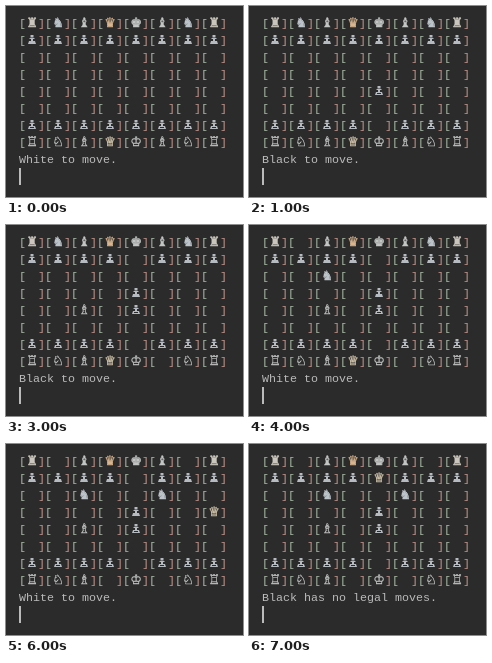
An HTML page for the animation above (8 s loop, 237 by 191 pixels).

```html
<!DOCTYPE html>
<html lang="en">
<meta charset="utf-8">
<title>Console chess</title>
<style>
  html, body { margin: 0; width: 100%; height: 100%; overflow: hidden; background: #2b2b2b; }
  svg { display: block; width: 237px; height: 191px; }
  text { font: 11.667px "Liberation Mono", monospace; fill: #bbb; white-space: pre; }
  .piece { font: 13px "DejaVu Sans", sans-serif; text-anchor: middle; fill: #c3c4c4; stroke: #c3c4c4; stroke-width: .3; }
  .pawn { fill: #b5bbc0; }
  .open { fill: #a9bba6; }
  .close { fill: #c4958c; }
</style>
<svg viewBox="0 0 237 191"></svg>
<script>
const svg = document.querySelector('svg');
const START = '♜♞♝♛♚♝♞♜' + '♟'.repeat(8) + ' '.repeat(32) + '♙'.repeat(8) + '♖♘♗♕♔♗♘♖';
const MOVES = ['e2e4', 'e7e5', 'f1c4', 'b8c6', 'd1h5', 'g8f6', 'h5e7'];
const TINTS = { '♜': '#cbc6bd', '♞': '#bcc4ca', '♛': '#d8b58f', '♕': '#d0c3aa' };
const HEAD = 'M-1.5-9h3v2.5h-3z M-2.5-6h5v1h-5z M-1-5h2v2h-2z';
const PAWNS = { '♟': HEAD + 'M-3-3h6l1 3h-8z', '♙': HEAD + 'M-3-3h6l1 3h-8z M-2-2v1h4v-1z' };
const LINE = 17, CELL = 26, LEFT = 13, TOP = 21;

function add(tag, attrs, content = '') {
  const node = document.createElementNS('http://www.w3.org/2000/svg', tag);
  for (const key in attrs) node.setAttribute(key, attrs[key]);
  node.textContent = content;
  return svg.appendChild(node);
}

const squares = [...START].map((_, i) => {
  const x = LEFT + i % 8 * CELL, y = TOP + (i >> 3) * LINE;
  add('text', { x, y, class: 'open' }, '[');
  add('text', { x: x + 19, y, class: 'close' }, ']');
  return {
    glyph: add('text', { x: x + 13, y, class: 'piece' }),
    pawn: add('path', { transform: `translate(${x + 13} ${y})`, class: 'pawn' })
  };
});
const message = add('text', { x: LEFT, y: TOP + 8 * LINE });
add('rect', { x: LEFT, y: 162, width: 2, height: LINE, fill: '#bbb' });

const index = square => (8 - square[1]) * 8 + square.charCodeAt(0) - 97;

function show(count) {
  const board = [...START];
  for (const move of MOVES.slice(0, count)) {
    const from = index(move.slice(0, 2));
    board[index(move.slice(2))] = board[from];
    board[from] = ' ';
  }
  board.forEach((piece, i) => {
    const { glyph, pawn } = squares[i];
    pawn.setAttribute('d', PAWNS[piece] || '');
    glyph.textContent = piece in PAWNS ? '' : piece;
    glyph.style.fill = glyph.style.stroke = TINTS[piece] || '';
  });
  message.textContent = count === MOVES.length ? 'Black has no legal moves.'
    : (count % 2 ? 'Black' : 'White') + ' to move.';
}

let shown = -1;
function tick() {
  const count = Math.floor(performance.now() % 8000 / 1000);
  if (count !== shown) show(shown = count);
  requestAnimationFrame(tick);
}
tick();
</script>
</html>
```
